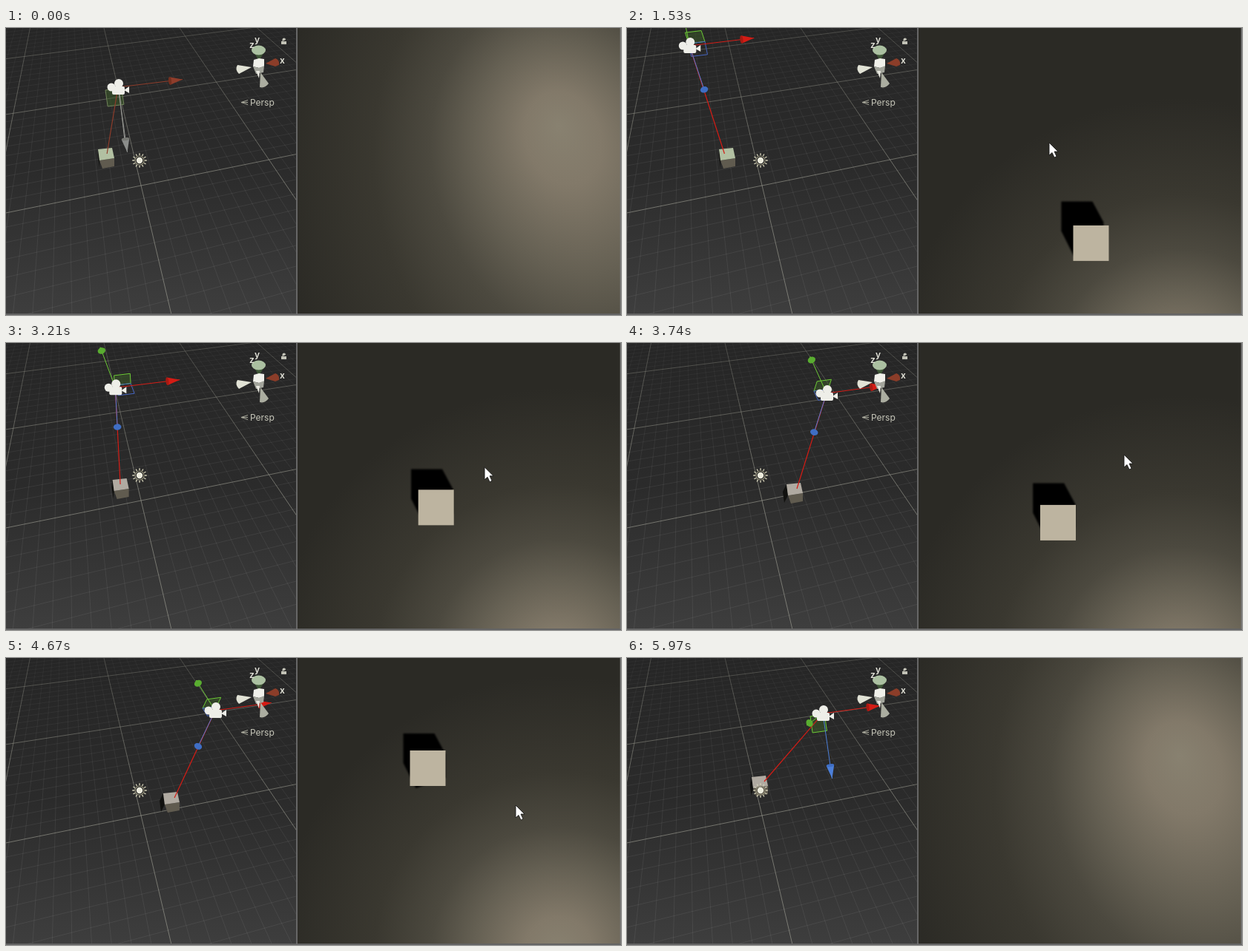
An HTML page that plays this animation: 829 px wide and 388 px high, repeating every 6.05 s.

```html
<!DOCTYPE html>
<html lang="en">
<head>
<meta charset="utf-8">
<title>Look-at camera</title>
<style>
  html, body { margin: 0; width: 100%; height: 100%; overflow: hidden; background: #282828; }
  svg { display: block; width: 829px; height: 388px; }
  text { font-family: Inter, Roboto, sans-serif; }
</style>
</head>
<body>
<svg viewBox="0 0 829 388">
  <defs>
    <linearGradient id="ground" x2="0" y2="1">
      <stop stop-color="#262626"/><stop offset=".5" stop-color="#2b2b2b"/><stop offset="1" stop-color="#3e3e3e"/>
    </linearGradient>
    <linearGradient id="fade" x2="0" y2="1">
      <stop stop-color="#fff" stop-opacity=".5"/><stop offset=".5" stop-color="#fff"/>
    </linearGradient>
    <mask id="haze"><rect width="392" height="388" fill="url(#fade)"/></mask>
    <radialGradient id="spot" gradientUnits="userSpaceOnUse" cx="0" cy="0" fx="0" fy="0" r="1">
      <stop stop-color="#888170"/><stop offset=".12" stop-color="#827969"/>
      <stop offset=".3" stop-color="#656053"/><stop offset=".45" stop-color="#4c493f"/>
      <stop offset=".65" stop-color="#3a3830"/><stop offset="1" stop-color="#2b2a25"/>
    </radialGradient>
    <filter id="soft"><feGaussianBlur stdDeviation="1"/></filter>
    <clipPath id="sceneClip"><rect width="391" height="386"/></clipPath>
    <clipPath id="gameClip"><rect x="393" width="435" height="386"/></clipPath>
  </defs>

  <g clip-path="url(#sceneClip)">
    <rect width="392" height="388" fill="url(#ground)"/>
    <g mask="url(#haze)" fill="none">
      <path id="minor" stroke="#fff" stroke-opacity=".07"/>
      <path id="major" stroke="#d4d4c4" stroke-opacity=".42"/>
    </g>
    <g id="scene"></g>
    <g stroke="#d0cdb5" fill="none">
      <circle cx="180" cy="179" r="6" stroke="#8d8a75" stroke-width="1.2"/>
      <circle cx="180" cy="179" r="4.2" fill="#ecebdc" stroke="none"/>
      <path id="rays" stroke-width="1.4"/>
    </g>
    <g>
      <path d="M334 33L341 44L348 33Z" fill="#3f5637"/>
      <ellipse cx="340.500" cy="30" rx="9.500" ry="6.500" fill="#abc0a1"/>
      <path d="M350 48L363 41Q369 43 368 50L363 52Z" fill="#8b3d29"/>
      <path d="M331 53L312 50Q308 56 314 62Z" fill="#e2e3d6"/>
      <path d="M334 43L341 41L348 42V52L341 54L333 52Z" fill="#f0f0ea"/>
      <path d="M333 52L341 54L348 51L347 60L337 62Z" fill="#a3a59c"/>
      <path d="M337 58H342L341 68Z" fill="#e8e8e0"/>
      <path d="M343 60L354 75Q349 82 342 80Z" fill="#abada0"/>
      <g fill="#e4e4da" font-size="12" font-weight="600">
        <text x="335" y="20">y</text><text x="328" y="27">z</text><text x="369" y="48">x</text>
      </g>
      <path d="M371 18H378V22H371ZM372.500 18V15.500Q372.500 13.500 375 13.500Q377 13.500 377 16" fill="#c2c2b6" fill-rule="evenodd"/>
      <path d="M326 97.500L317 100.500L326 103.500M317 100.500H326" fill="none" stroke="#a9a99c"/>
      <text x="329" y="105" font-size="12" fill="#c6c6b9">Persp</text>
    </g>
  </g>

  <g clip-path="url(#gameClip)">
    <rect x="393" width="436" height="388" fill="url(#spot)"/>
    <g id="game"></g>
  </g>
  <path d="M392 0V387M0 387H829M828.500 0V387" fill="none" stroke="#777" stroke-width="1.600"/>
</svg>

<script>
const LOOP = 6050;
const $ = id => document.getElementById(id);
const mix = (a, b, k) => a + (b - a) * k;
const ramp = (t, from, to) => Math.min(1, Math.max(0, (t - from) / (to - from)));
const add = (p, x, y) => [p[0] + x, p[1] + y];
const shift = (points, x, y) => points.map(p => add(p, x, y));
const segment = (a, b) => `M${a}L${b}`;

// Perspective of the ground plane; whole numbers are major lines.
function project(u, v) {
  const w = 1 + 0.0529 * u - 0.27 * v;
  return [(153.9 + 144.6 * u - 21 * v) / w, (93.1 - 16.1 * u + 62.4 * v) / w];
}

function drawGrid() {
  let minor = '', major = '';
  for (let i = -30; i <= 40; i++) {
    const k = i / 10;
    const along = segment(project(k, -2), project(k, 2.6));
    const across = k < 2.8 ? segment(project(-3, k), project(4, k)) : '';
    if (i % 10) minor += along + across; else major += along + across;
  }
  $('minor').setAttribute('d', minor);
  $('major').setAttribute('d', major);
}

function drawRays() {
  let rays = '';
  for (let angle = 0; angle < 6.28; angle += Math.PI / 6) {
    const at = r => [180 + r * Math.cos(angle), 179 + r * Math.sin(angle)];
    rays += segment(at(7), at(9.8));
  }
  $('rays').setAttribute('d', rays);
}

// Key points: time, x, y.
const paths = {
  camera: [[70, 151, 80], [380, 100, 17], [610, 85, 24], [1860, 84, 24], [2510, -14, 50], [3740, 269, 68], [4670, 282, 71], [5970, 264, 75]],
  cube: [[1860, 135, 176], [2510, 60, 189], [3740, 226, 203], [4670, 223, 195], [5300, 155, 171], [5590, 179, 173]],
  box: [[380, 600, 440], [1530, 625.5, 291], [2510, 578, 195], [3740, 581, 243], [4670, 568.5, 149]],
  cursor: [[380, 605, 72], [1530, 569, 155], [2510, 612, 190], [3740, 670, 151], [4670, 687, 199]]
};

function position(path, t) {
  const next = path.findIndex(key => key[0] > t);
  if (next <= 0) return path.at(next).slice(1);
  const [t0, x0, y0] = path[next - 1], [t1, x1, y1] = path[next];
  const k = (t - t0) / (t1 - t0);
  return [mix(x0, x1, k), mix(y0, y1, k)];
}

// 1 while the camera faces the floor, 0 while it looks at the cube.
const tiltDown = t => 1 - ramp(t, 70, 380) + ramp(t, 5050, 5590);

const poly = (points, attrs) => `<polygon points="${points.join(' ')}" ${attrs}/>`;
const line = (a, b, color, width = 1) => `<path d="${segment(a, b)}" stroke="${color}" stroke-width="${width}"/>`;

function cone(tip, [dx, dy], length, color, shade) {
  const angle = Math.atan2(dy, dx) * 180 / Math.PI;
  return `<g transform="translate(${tip}) rotate(${angle}) translate(${-length})">
    <path d="M0 -5.300L${length} 0L0 5.300Z" fill="${color}"/>
    <ellipse rx="${length > 12 ? 2 : 4.2}" ry="5.300" fill="${shade}"/></g>`;
}

function drawCube([x, y], t) {
  const top = [[-11, -12], [8, -14], [11, 0], [-9, 3]];
  const front = [[-9, 3], [11, 0], [11, 11], [-5, 14]];
  const lean = (135 - x) / 18;
  const edge = lean > 0 ? [top[1], top[2]] : [top[0], top[3]];
  const side = [...edge, ...shift(edge, lean, 10).reverse()];
  const at = points => shift(points, x, y);
  return poly(at(side), 'fill="#11110f"') + poly(at(front), 'fill="#605b4f"') +
    poly(at(top), `fill="${t < 1900 ? '#b2c0a2' : '#b0aaa1'}"`);
}

function drawCameraIcon([x, y]) {
  return `<g transform="translate(${x} ${y})" fill="#eeeee8">
    <circle cx="-9" r="5.500"/><circle cx="1" cy="-5" r="6"/>
    <rect x="-8" y="-1" width="17" height="11" rx="2"/><path d="M8 4L15 -1V8Z"/></g>`;
}

function drawScene(t) {
  const idle = t < 70;
  const [red, green, blue] = idle ? ['#8f3d2b', '#71845a', '#8b8d8b'] : ['#d41c15', '#6cc936', '#4c7fd8'];
  const cam = position(paths.camera, t), cube = position(paths.cube, t);
  const down = tiltDown(t), facingFloor = down > .5;

  const x = [87 - Math.max(0, cam[0] - 150) * .085, -10.5];
  const y = [mix(-8 - t * .0038, -22, down), mix(-84 + t * .0092, 16, down)];
  const z = [mix((cube[0] - cam[0]) * .39, 12.5, down), mix((cube[1] - cam[1]) * .39, 88, down)];
  const xTip = add(cam, ...x), yTip = add(cam, ...y), zTip = add(cam, ...z);

  const corner = add(cam, facingFloor || z[0] < 0 ? -17 : -1, facingFloor ? 4 : -3);
  const plane = (a, b, sign) => {
    const [ax, ay, bx, by] = [a[0] / 4, a[1] / 4, sign * b[0] / 4, sign * b[1] / 4];
    return [corner, add(corner, ax, ay), add(corner, ax + bx, ay + by), add(corner, bx, by)];
  };

  let out = drawCube(cube, t);
  out += poly(plane(x, z, facingFloor ? 1 : -1), `fill="#3d6428" fill-opacity=".45" stroke="${green}"`);
  if (!facingFloor) out += poly(plane(x, y, -1), 'fill="none" stroke="#4767c2"');
  out += line(cam, add(cube, (cam[0] - cube[0]) * .07, -6), red, 1.2);
  out += line(cam, xTip, red) + cone(xTip, x, 17, red, idle ? '#75301f' : '#a81a12');
  if (!idle) out += line(cam, yTip, green) + cone(yTip, y, 5, '#67be35', '#59ad30');
  out += line(cam, zTip, blue);
  if (idle) out += line(add(cam, 2, 10), add(zTip, -3, -12), '#9a9a94');
  out += cone(zTip, z, 18 * down, blue, idle ? '#777873' : '#3f6ec4');
  return out + drawCameraIcon(cam);
}

function drawGame(t) {
  const [x, y] = add(position(paths.box, t), 0, -520 * tiltDown(t));
  const shadow = [[0, 0], [42, 0], [57, 28], [57, 60], [17, 74], [0, 40]];
  const reach = [-9 - Math.max(0, x - 575) * .14, -13 - y * .067];
  let out = poly(shift(shadow, x - 24 + reach[0], y - 24 + reach[1]), 'fill="#020202" filter="url(#soft)"');
  out += `<rect x="${x - 24}" y="${y - 24}" width="48" height="48" fill="#bdb4a0"/>`;
  if (t >= 150 && t < 5670) {
    out += `<path transform="translate(${position(paths.cursor, t)})"
      d="M0 0V17L4 13.500L7 20L10 18.500L7 12H12Z" fill="#fff" stroke="#111" stroke-width=".8"/>`;
  }
  return out;
}

function aimSpot(t) {
  const down = tiltDown(t), boxY = position(paths.box, t)[1];
  const y = mix(320 + boxY / 2, 132, down);
  const scale = [mix(380, 420, down), mix(370, 540, down)];
  $('spot').setAttribute('cy', .28 * down);
  $('spot').setAttribute('gradientTransform', `translate(745 ${y}) rotate(${-20 * down}) scale(${scale})`);
}

function render(t) {
  aimSpot(t);
  $('scene').innerHTML = drawScene(t);
  $('game').innerHTML = drawGame(t);
}

drawGrid();
drawRays();
const start = performance.now();
function tick() {
  render((performance.now() - start) % LOOP);
  requestAnimationFrame(tick);
}
tick();
</script>
</body>
</html>
```
